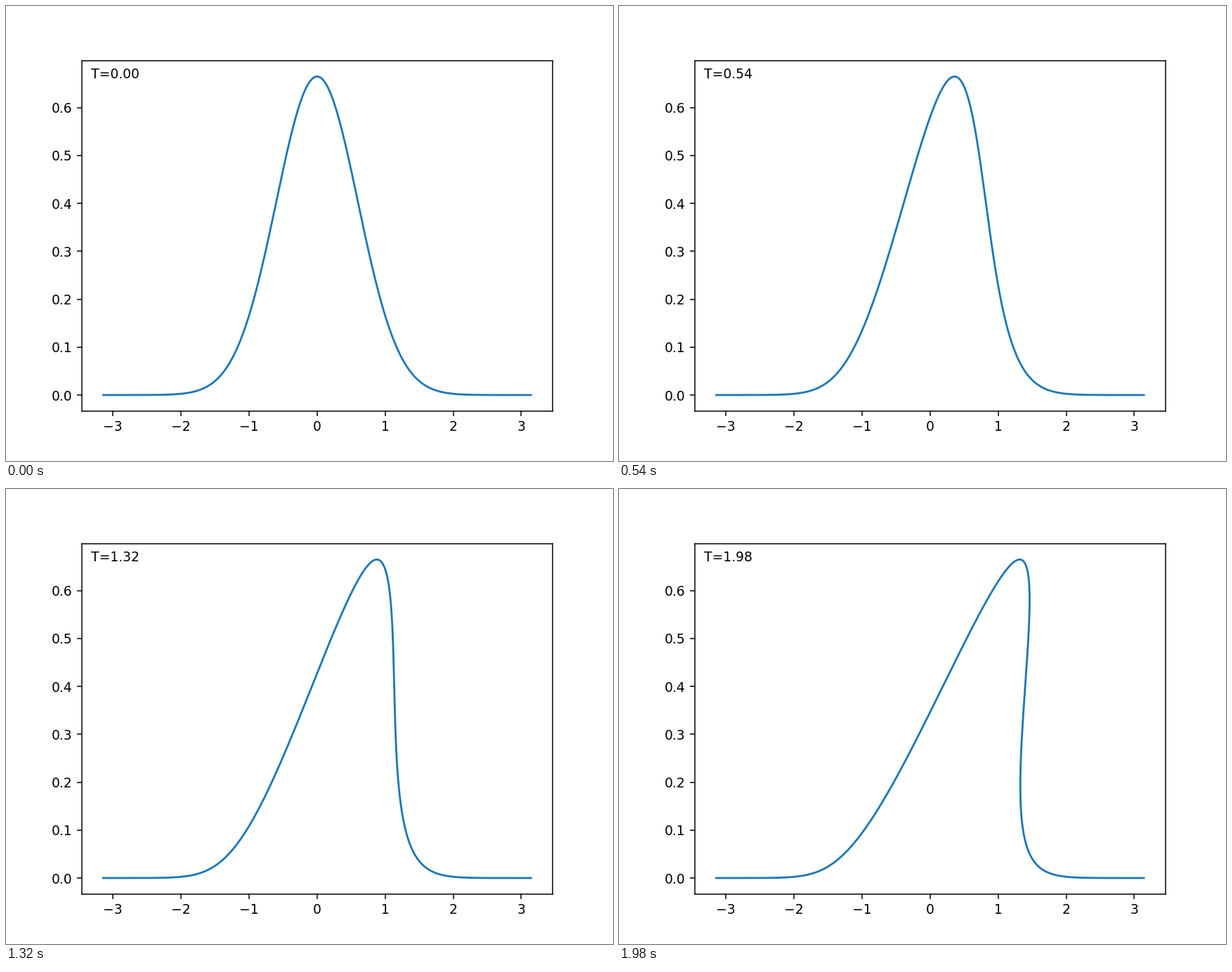
Recreate the animation shown at these times as a matplotlib script. Size 864 px wide and 648 px high, loop 2000 ms.

```python
import numpy as np
import matplotlib.pyplot as plt
from matplotlib.animation import FuncAnimation

FRAMES = 100
INTERVAL = 20  # ms
SIGMA = 0.6

plt.rcParams["font.family"] = "DejaVu Sans"

# Inviscid Burgers equation: each point travels at its own height.
x0 = np.linspace(-np.pi, np.pi, 1001)
u = np.exp(-x0**2 / (2 * SIGMA**2)) / (SIGMA * np.sqrt(2 * np.pi))

fig, ax = plt.subplots(figsize=(6.4, 4.8), dpi=135)
line, = ax.plot(x0, u)
label = ax.text(0.02, 0.95, "T=0.00", transform=ax.transAxes)


def update(i):
    t = i * INTERVAL / 1000
    line.set_data(x0 + t * u, u)
    label.set_text(f"T={t:.2f}")
    return line, label


anim = FuncAnimation(fig, update, frames=FRAMES, interval=INTERVAL,
                     repeat=True, repeat_delay=0)
plt.show()
```
